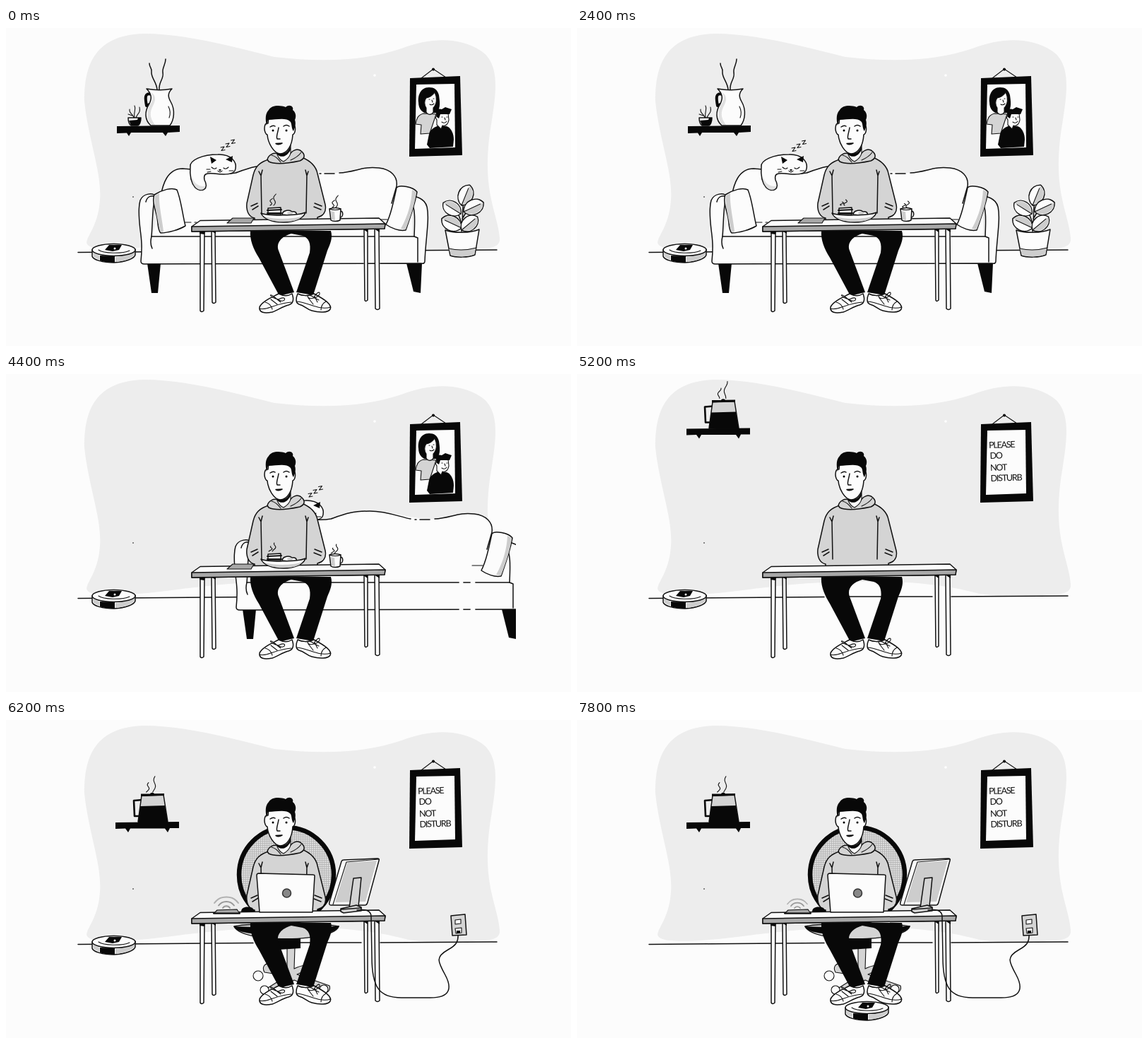
These frames come from a looping animation (800 by 450 pixels, 8000 ms). An HTML page:

```html
<!DOCTYPE html>
<html lang="en">
<head>
<meta charset="utf-8">
<title>From living room to home office</title>
<style>
html, body { margin: 0; width: 100%; height: 100%; overflow: hidden; background: #fcfcfc; }
svg { display: block; width: 100%; height: 100%; }
.w { fill: #fcfcfc; stroke: #111; }
.g { fill: #d4d4d4; stroke: #111; }
.d { fill: #a8a8a8; stroke: #111; }
.n { fill: none; stroke: #111; }
.k { fill: #080808; stroke: none; }
.s { fill: #cdcdcd; stroke: none; }
.t { stroke-width: 1.1; }
text { font: 12.5px Lato, "Open Sans", sans-serif; letter-spacing: -1.2px; fill: #111; }
</style>
</head>
<body>
<svg viewBox="0 0 800 450" stroke-width="1.5" stroke-linejoin="round" stroke-linecap="round">
<defs>
  <clipPath id="stage"><path d="M78 0H722V450H78Z"/></clipPath>
  <pattern id="mesh" width="3" height="3" patternUnits="userSpaceOnUse">
    <path d="M0 0H3V3H0Z" fill="#dcdcdc"/><path d="M0 .5H3M.5 0V3" stroke="#b0b0b0" stroke-width=".7"/>
  </pattern>
  <path id="z" class="n t" d="M0 1L5 0L1 5.500L6 4.500"/>
  <g id="leaf">
    <path class="w" d="M0 0C-14 -6 -14 -26 0 -31C14 -26 14 -6 0 0Z"/>
    <path class="s" d="M0 -1C12 -7 12 -25 0 -30Z"/>
    <path class="n t" d="M0 0V-26"/>
  </g>
</defs>

<path fill="#ededed" d="M115 300C118 290 131 276 133 243C136 205 117 160 111 104C111 60 120 10 195 8C250 8 312 24 380 41C450 49 510 46 560 29C600 14 640 12 672 32C700 50 694 90 688 130C682 165 680 195 684 225C688 255 697 275 699 297C700 309 690 312 670 312C640 315 600 316 570 311C530 300 480 293 420 294C350 292 290 299 250 304C215 309 160 315 130 312C117 310 112 306 115 300Z"/>
<circle cx="522" cy="67" r="1.800" fill="#fff"/><circle cx="180" cy="239" r=".8"/>
<path class="n" d="M102 317.500L350 315.500M380 315L503 315M530 315L695 314"/>

<g clip-path="url(#stage)">
<g id="vases">
  <path class="k" d="M157 139L246 138V147L229 148L226 153L222 148L177 148L174 153L171 148.500L157 149Z"/>
  <path class="n" d="M214 87C213 76 205 70 206 62C207 57 203 56 203 50M217 87C216 76 224 72 222 63C221 56 226 52 226 44"/>
  <path fill="none" stroke="#080808" stroke-width="4" d="M206 94C196 91 197 99 199 110L203 108"/>
  <path class="w" d="M199 86C210 88 225 88 235 86C229 92 229 97 233 104C240 116 238 130 232 138H205C196 130 196 118 203 107C207 99 206 93 199 86Z"/>
  <path class="s" d="M205 91C210 98 207 104 203 110C198 121 200 131 206 137H211C203 127 203 119 209 108C213 100 211 94 205 91Z" opacity=".6"/>
  <path class="n t" d="M230 111C233 117 233 122 231 127"/>
  <path class="n t" d="M181 128C181 121 174 122 175 115M182 127C180 118 185 116 182 110M184 128C185 120 191 122 189 112M173 122L179 124"/>
  <path class="w" d="M173 127H191C191 133 189 138 186 138H177C174 136 173 132 173 127Z"/>
  <path class="k" d="M174 131L186 130L187 127H191C191 133 189 138 186 138H177Z"/>
</g>

<g id="pot">
  <path class="k" d="M155 145L245 144V153L232 153L229 159L225 153.500L176 153.500L173 159L169 153.500L155 154Z"/>
  <path fill="none" stroke="#080808" stroke-width="2.600" d="M193 113L181 114L182 136H189"/>
  <path class="g" d="M192 107L223 106L229 144H187Z"/>
  <path class="k" d="M190 122L225 121L229 145H187ZM191 104.500L224 104V107L191 108ZM204 105C204 102 210 102 210 105Z"/>
  <path id="potSteam" class="n t"/>
</g>

<path class="n t" d="M588 71L605 58L623 70"/><circle cx="605" cy="58.500" r="2"/>
<path class="k" d="M572 71L643 68L646 180L571 182Z"/>
<path fill="#fcfcfc" d="M581 80L635 79L636 169L579 171Z"/>
<g id="family">
  <path class="k" d="M599 84C586 84 583 97 584 105C584 115 590 121 598 121L610 120C616 113 614 103 613 95C611 87 606 84 599 84Z"/>
  <path class="g t" d="M591 121C583 123 581 129 580 136L588 137L587 150L600 149L609 122Z"/>
  <path class="w t" d="M595 99C601 98 605 94 607 91C611 99 610 108 605 113L605 119C602 124 597 123 595 119V113C592 109 592 102 595 99Z"/>
  <path class="n t" d="M599 101h1M605 100h1M603 102L604 105M600 108Q603 110 606 107"/>
  <path class="k" d="M596 165L599 150C601 143 607 140 613 138L624 139C631 142 634 150 634 158L633 168L600 170Z"/>
  <path class="w t" d="M612 121H626L627 130C626 137 622 139 618 138L616 143L610 137V130C607 127 609 124 611 124Z"/>
  <path class="k" d="M610 126C607 117 611 113 617 115L622 112L631 115L628 122H615L613 128Z"/>
  <path class="n t" d="M617 126h1M624 126h1M621 127L622 130M617 133Q621 136 624 132"/>
</g>
<g id="sign" transform="rotate(-2 585 130)">
  <text x="584" y="105">PLEASE</text><text x="585" y="120">DO</text>
  <text x="585" y="137">NOT</text><text x="585" y="152">DISTURB</text>
</g>

<g id="plant">
  <path class="n" d="M645 288C648 270 645 262 648 246M645 276L640 262M646 270L652 260"/>
  <use href="#leaf" transform="translate(645 251) rotate(22)"/>
  <use href="#leaf" transform="translate(644 263) rotate(-58) scale(.95)"/>
  <use href="#leaf" transform="translate(648 260) rotate(65)"/>
  <use href="#leaf" transform="translate(645 283) rotate(-65)"/>
  <use href="#leaf" transform="translate(645 286) rotate(50) scale(.95)"/>
  <path class="w" d="M622 286C635 291 658 290 670 285L664 321C655 325 637 325 629 322Z"/>
  <path class="s" d="M627 312C640 315 655 314 665 311L663 320C655 324 637 324 630 321Z"/>
  <path class="n t" d="M627 312C640 315 655 314 666 311"/>
</g>

<g id="sofa">
  <path class="k" d="M200 333H219L215 375H206ZM567 333H589L587 375L577 373Z"/>
  <path fill="#fcfcfc" d="M219 240C222 222 228 199 250 199L262 200C290 206 310 208 325 205C345 198 355 194 380 194C415 194 440 206 468 205C495 204 505 195 528 198C545 200 555 210 553 224L575 250V333H200Z"/>
  <path class="n" d="M219 238C222 222 228 199 250 199L262 200C290 206 310 208 325 205C345 198 355 194 380 194C405 194 425 203 438 205M444 206h2M451 206h14M472 205C495 204 505 195 528 198C545 200 555 210 553 224L546 248"/>
  <path class="n t" d="M250 275H262M267 275h3M525 271H540"/>
  <path class="w" d="M191 330C193 310 192 300 190 285C188 268 187 254 190 244C194 234 208 232 213 239C207 247 208 270 206 295H578C579 270 580 255 572 240C578 236 593 241 596 253C600 270 594 300 593 330Q593 334 588 333L196 334Q191 334 191 330Z"/>
  <path class="n" d="M206 295C204 303 205 308 207 312M578 295L583 297V331M213 239C206 236 200 238 198 246"/>
  <path stroke="#fcfcfc" stroke-width="3" d="M508 295h3M524 295h4M508 333h3M524 333h4"/>
  <path class="w" d="M210 236C221 229 235 225 242 229C248 243 250 265 254 280C246 285 230 290 219 290C214 285 216 275 213 264C210 253 207 243 210 236Z"/>
  <path class="s" d="M211 237L217 234C216 250 221 270 223 288L219 289C215 275 209 247 211 237Z"/>
  <path class="w" d="M553 226C557 221 577 225 582 232C579 250 572 269 566 286C557 288 545 283 538 278C546 263 549 244 553 226Z"/>
  <path class="s" d="M575 229L581 232C579 250 572 269 566 285L559 284C568 268 574 250 575 229Z"/>
  <g id="cat">
    <path class="w" d="M261 196C260 187 278 179 300 179C319 178 327 190 325 199C324 208 309 208 295 206C284 205 279 206 281 215C288 228 277 234 268 226C262 219 260 207 261 196Z"/>
    <path class="s" d="M263 210C266 219 272 225 282 224C281 231 273 231 268 225C264 221 263 215 263 210Z" opacity=".6"/>
    <path class="k" d="M289 182L298 187L291 192ZM311 186L321 181L320 190Z"/>
    <path class="n t" d="M291 197Q295 201 298 198M308 198Q311 201 315 197M300 202Q303 206 306 202M284 200L289 200M285 204L290 203M316 202L322 202"/>
    <path class="k" d="M301 200h4l-2 3Z"/>
    <g id="zzz"><use href="#z" x="304" y="168"/><use href="#z" x="311" y="163"/><use href="#z" x="318.500" y="158"/></g>
  </g>
</g>

<g id="chair">
  <path class="g t" d="M398 322H409L408 352C420 346 428 346 430 352L412 360L458 376C460 382 456 386 451 386L408 368L372 390C364 392 362 386 366 382L398 362L366 357C362 350 366 344 373 345L398 353Z"/>
  <g class="w t"><circle cx="357" cy="362" r="7"/><circle cx="366" cy="382" r="6"/><circle cx="450" cy="381" r="6"/></g>
  <ellipse cx="397" cy="219" rx="67" ry="67" fill="url(#mesh)" stroke="#080808" stroke-width="6.500"/>
  <path class="g" d="M323 292C345 287 445 287 471 292C468 302 440 309 398 310C355 309 328 303 323 292Z"/>
  <path class="k" d="M322 292L350 293L355 303C337 301 326 299 322 292ZM440 303L448 294L472 291C468 299 458 302 440 303ZM384 309H417V323L386 325Z"/>
</g>

<g id="man">
  <path class="k" d="M346 287H460C463 297 459 306 455 315L435 378L411 374L430 318C432 305 429 297 420 294L404 291C390 295 382 304 386 315L408 374L387 379L358 325C350 312 345 300 346 287Z"/>
  <path class="w" d="M386 376C377 381 362 387 359 395C358 403 366 404 377 402C385 399 392 394 400 392C407 390 408 384 405 376C399 380 392 379 386 376Z"/>
  <path class="w" d="M413 376C410 383 410 389 415 391C423 393 426 398 433 400C444 403 456 403 459 398C462 391 451 384 436 376C428 380 419 379 413 376Z"/>
  <path class="n t" d="M359 397C370 400 380 390 404 388M367 388Q375 390 377 398M375 384L384 391M380 381L389 388M384 384C370 371 372 382 386 384C398 377 397 390 386 385M412 387C430 389 443 400 460 395M453 387Q446 391 446 399M428 382L435 391M437 380L441 388M436 381C444 367 449 378 437 382C424 372 424 386 436 382M437 382L443 385"/>
  <path class="g" d="M372 186C359 190 353 196 350 208L341 248C340 258 343 267 352 269V273H441V268C449 266 454 260 452 250L441 206C439 196 431 188 419 183Z"/>
  <path class="n" d="M361 207L362 262M358 203L361 209L363 201M426 207L425 262M424 201L426 209L428 203M347 252L356 248M349 257L357 252M437 248L447 252M436 253L446 257"/>
  <path class="g" d="M370 186C372 179 379 176 385 178L400 182C404 173 413 169 419 175C424 180 423 185 416 188C402 191 382 194 372 189Z"/>
  <path class="n t" d="M376 180C381 181 386 186 389 190M403 187C410 184 415 180 418 176"/>
  <path class="w t" d="M384 170V179C386 184 390 188 393 189C398 186 402 182 403 177V162Z"/>
  <path class="k" d="M384 173C392 182 400 176 403 166V172C399 181 391 185 384 179Z"/>
  <path class="w" d="M371 135C364 133 365 150 370 151C371 163 379 177 388 178C398 178 405 167 406 151C410 149 411 139 407 137V126H372Z"/>
  <path class="k" d="M369 138C367 129 367 121 372 116C376 109 388 109 396 112C401 107 408 111 406 116C411 120 411 126 409 130C411 136 409 141 407 146C404 142 405 137 403 133C396 126 384 130 371 130Z"/>
  <path class="n" d="M374 140Q378 137 381 139M393 139Q397 136 401 139M386 141C385 149 382 153 384 157L388 157M382 163.500Q386 166 391 163Z"/>
  <circle cx="378" cy="145" r="1.500"/><circle cx="397" cy="145" r="1.500"/>
</g>

<path class="w" d="M291 287H296L297 388Q294 391 292 388ZM507 285H512V385Q509 388 508 385ZM275 288H281L280 400Q277 403 275 400ZM522 284H528L529 397Q526 400 523 397Z"/>
<path class="k" d="M274 287H282L281 292L274 291ZM290 287H297V291ZM506 285H512V289ZM521 284H529V289Z"/>
<path class="w" d="M263 281L275 272.500L528 269L537 277L536 284L263 288Z"/>
<path class="d" d="M263 281L537 277L536 284L263 288Z"/>

<g id="meal">
  <path class="d t" d="M313 276L321 269L351 269L347 276Z"/>
  <path class="w" d="M371 255L389 254V264H371Z"/><path class="n" d="M370 258L390 257M370 262H390" stroke-width="2"/>
  <path class="w" d="M391 264C392 257 402 257 405 260C412 259 413 265 409 266Z"/><ellipse cx="402" cy="262" rx="4" ry="2" class="s"/>
  <path class="w" d="M361 262C370 266 413 266 424 261C421 270 408 275 393 275C378 275 365 271 361 262Z"/>
  <path class="s" d="M366 267C381 271 406 271 420 266C414 273 404 274 393 274C380 274 371 272 366 267Z"/>
  <path id="foodSteam" class="n t"/>
</g>
<g id="mug">
  <path class="n" d="M473 259C478 258 478 268 473 268"/>
  <path class="w" d="M458 256C463 254 470 254 474 256L473 272C469 274 463 274 460 272Z"/>
  <path class="s" d="M460 259L465 260L466 272L461 271Z"/>
  <path class="n t" d="M458 256Q466 259 474 256"/>
  <path id="mugSteam" class="n t"/>
</g>

<g id="left">
  <path class="k" d="M333 271C333 265 341 263 349 266L352 271Z"/>
  <path class="d t" d="M294 274L299 269L327 268L331 274Z"/><path d="M294 273.500H331" stroke="#111" stroke-width="2"/>
  <g id="wifi" fill="none" stroke="#999" stroke-width="2">
    <path d="M-5 -1A6 6 0 0 1 5 -1"/><path d="M-11 -4.500A13 12 0 0 1 11 -4.500"/><path d="M-17 -8A20 18 0 0 1 17 -8" stroke="#b0b0b0"/>
  </g>
  <path class="w" d="M358 217L435 219Q437 219 437 221L434 272H359L355 220Q355 217 358 217Z"/>
  <circle cx="397.500" cy="245" r="6" fill="#888" stroke="#333"/>
</g>
<g id="right">
  <path class="w" d="M478 198L526 196Q529 196 528 199L512 258Q511 262 508 262L460 262Q457 262 458 258L475 200Q476 198 478 198Z"/>
  <path class="s" d="M483 202L525 199L509 257L466 258Z"/>
  <path class="n t" d="M528 197L482 201L463 261"/>
  <path class="g" d="M492 224L503 223L499 264L486 266Z"/>
  <path class="g" d="M474 267L496 262L503 265V270L478 273L474 271Z"/><path class="n" d="M474 268L503 266"/>
  <path class="n" d="M497 269C509 267 517 270 517 278L518 335C518 378 528 393 560 393H598C633 394 630 376 622 361C611 341 608 335 626 325C637 319 641 314 640 302"/>
  <path class="g" d="M630 277L650 275L652 304L632 305Z"/>
  <path class="w t" d="M636 283L644 282V288L636 289ZM636 295L645 294V301L637 302Z"/>
  <path class="k" d="M638 298h5v4h-5Z"/>
</g>

<g id="vac">
  <path class="w" d="M-30 -4V5C-29 10 -15 14 1 14C18 13 30 8 31 3V-5Z"/>
  <path class="k" d="M-19 4L2 5V14C-8 14 -14 13 -19 11Z"/>
  <path class="s" d="M3 6C14 5 25 2 30 -1V3C26 8 15 12 3 13ZM-29 0L-20 4V10L-28 6Z"/>
  <ellipse class="w" cx=".5" cy="-4" rx="30.500" ry="8.500"/>
  <path class="k" d="M-12 -4L-6 -11L12 -11L8 -4L-1 -2Z"/><circle cx="2" cy="-6" r="1.500" fill="#eee"/>
  <path class="n t" d="M-21 -4C-14 1 12 2 23 -3"/>
</g>
</g>
</svg>
<script>
const LOOP = 8000, STEP = 200;
const el = id => document.getElementById(id);
const clamp = v => Math.max(0, Math.min(1, v));
const span = (t, a, b) => clamp((t - a) / (b - a));
const easeOut = p => 1 - (1 - p) ** 3;
const wave = (t, period) => 2 * Math.PI * t / period;
const move = (id, x, y = 0, more = '') => el(id).setAttribute('transform', `translate(${x} ${y})${more}`);
const show = (id, on) => el(id).style.display = on ? '' : 'none';

// Two wavy strands of vapour standing on (x, y)
function steam(id, x, y, h, phase, gap = 5) {
  const strand = (x0, y0, len) => {
    let d = '';
    for (let i = 0; i <= 8; i++) {
      const px = x0 + i * .3 + 1.8 * Math.sin(i * .85 + phase);
      d += (i ? 'L' : 'M') + px.toFixed(1) + ' ' + (y0 - len * i / 8).toFixed(1);
    }
    return d;
  };
  el(id).setAttribute('d', strand(x, y, h * .6) + strand(x + gap, y, h));
}

const vacPath = [[152, 318], [138, 320], [118, 336], [114, 366], [151, 401], [243, 419], [335, 418], [410, 411]];
function vacAt(t) {
  const u = span(t, 6400, 7800) * (vacPath.length - 1);
  const i = Math.min(Math.floor(u), vacPath.length - 2);
  return vacPath[i].map((v, k) => v + (vacPath[i + 1][k] - v) * (u - i));
}

function draw(t) {
  const ph = wave(t, 1600);
  const h = 12 + 4 * Math.cos(ph);
  steam('foodSteam', 374, 251, h, ph);
  steam('mugSteam', 462, 254, h + 1, ph);
  steam('potSteam', 200, 102, 23 + Math.sin(ph), ph, 9);
  move('zzz', 0, .5 - .5 * Math.cos(ph));

  move('plant', 0, -330 * span(t, 3600, 4000) ** 2);
  move('vases', 0, -160 * span(t, 4000, 4380) ** 2);
  const slide = Math.max(0, t - 4000) / 400;
  move('sofa', Math.min(600, 135 * slide ** 2));
  move('cat', Math.max(-50, -11 * slide ** 2));
  const clear = span(t, 4400, 5000) ** 2;
  move('meal', -360 * clear);
  move('mug', 280 * clear);

  show('family', t < 4800);
  show('sign', t >= 4800);
  move('pot', 0, -160 * (1 - easeOut(span(t, 5000, 5800))));

  const enter = 1 - easeOut(span(t, 5200, 6000));
  move('left', -370 * enter);
  move('right', 280 * enter);
  move('chair', 410 * enter);
  const s = .91 + .09 * Math.sin(wave(t, 1000));
  move('wifi', 312, 267, ` scale(${s})`);
  move('vac', ...vacAt(t));
}

const start = performance.now();
function tick(now) {
  const t = Math.max(0, now - start) % LOOP;
  draw(Math.floor(t / STEP) * STEP);
  requestAnimationFrame(tick);
}
draw(0);
requestAnimationFrame(tick);
</script>
</body>
</html>
```
